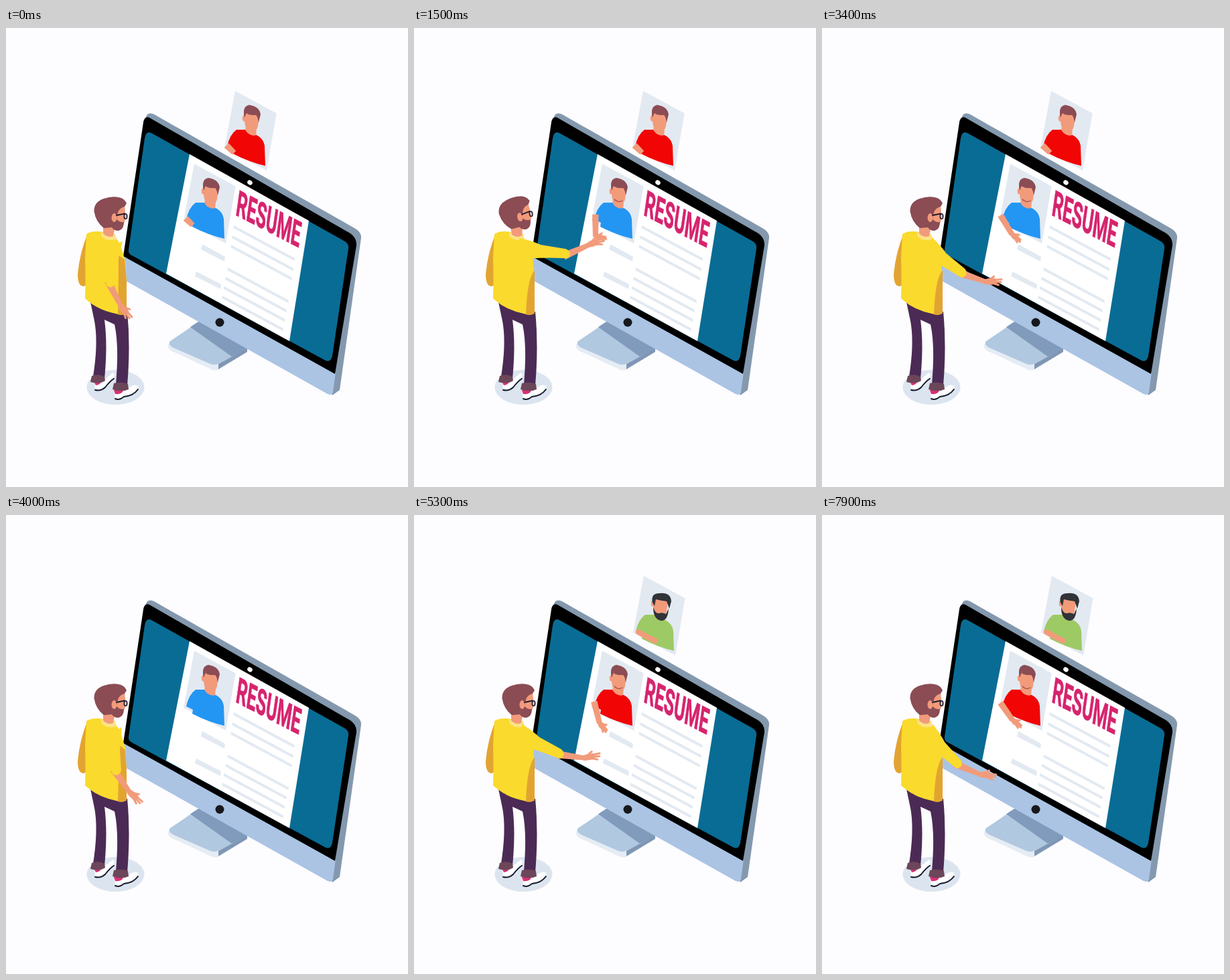
An HTML page that plays this animation: 600 by 686 pixels, repeating every 8 s.

```html
<!DOCTYPE html>
<html lang="en">
<head>
<meta charset="utf-8">
<title>Resume handshake</title>
<style>
  html, body { margin: 0; width: 100%; height: 100%; overflow: hidden; background: #fdfcfe; }
  svg { display: block; width: 100%; height: 100%; }
  .title { font: 700 49px Roboto, "Open Sans", sans-serif; fill: #d6246e; stroke: #d6246e; stroke-width: .7px; vector-effect: non-scaling-stroke; }
</style>
</head>
<body>
<svg id="stage" viewBox="0 0 600 686"></svg>
<script>
const LOOP = 8000, CYCLE = 4400;
const SKIN = '#f29b7b', HAIR = '#8b4c54', PALE = '#e2e9f1', YELLOW = '#fada2c', ORANGE = '#e2a431';
const SHOULDER = [163, 325], PHOTO_SHOULDER = [271, 287];

const shape = (d, fill, extra = '') => `<path d="${d}" fill="${fill}" ${extra}/>`;
const stroke = (d, color, width) =>
  `<path d="${d}" fill="none" stroke="${color}" stroke-width="${width}" stroke-linecap="round" stroke-linejoin="round"/>`;
const textLine = (x, y) => shape(`M${x},${y} l91,49 l-.7,4 l-91,-49 Z`, PALE);

const photoArm = id => `
  <g ${id ? `id="${id}"` : ''} transform="translate(${PHOTO_SHOULDER}) rotate(45)">
    ${shape('M-4,-4.500 L12,-4 V4 L-4,5 Z', SKIN)}
  </g>`;

const shortHair = shape('M295,243 Q291,226 302,224 Q317,226 319,238 L316,250 Q315,242 312,239 Q302,240 298,236 Z', HAIR);
const darkHairAndBeard =
  shape('M294,243 Q291,229 304,229 Q321,227 322,241 L319,252 Q317,246 315,241 Q306,240 299,238 L297,248 Z', '#303338') +
  shape('M295,250 Q299,260 303,259 Q309,257 314,260 L318,252 Q317,270 307,270 Q295,268 295,250 Z', '#303338') +
  stroke('M273,287 L286,294 L298,300', SKIN, 8);

function person(shirt, details) {
  return `
    ${shape('M281,203 L342.500,236.500 L328,322 L265,288 Z', PALE)}
    ${shape('M297,254 L313,258 L312,271 Q305,276 296,264 Z', SKIN)}
    ${shape('M296,261 Q302,272 313,269 Q323,274 325,285 L326,315 Q301,309 278,297 L279,291 L269,286 Q273,268 283,261 Z', shirt)}
    <ellipse cx="294.500" cy="244" rx="2.800" ry="4.500" fill="${SKIN}"/>
    ${shape('M297,233 Q310,231 317,242 L315,256 Q312,266 306,266 Q296,263 295,249 Z', SKIN)}
    ${details}`;
}

const photoHand = `
  <g id="photoHand">
    <ellipse cx="5" cy="0" rx="7" ry="4.500" fill="${SKIN}"/>
    ${stroke('M7,-2 L15,-1 M7,1 L16,2 M6,2 L13,5', SKIN, 3)}
    ${stroke('M3,-2 L9,-6', SKIN, 2.800)}
  </g>`;

const monitor = `
  ${shape('M242,473 V477 Q243,481 250,484 L306,510 Q313,513 318,510 L359,485 V478 L281,442 Z', '#e5ecf4')}
  ${shape('M245,468 L282,443 L360,480 L318,501 Q312,505 305,502 L250,478 Q241,473 245,468 Z', '#b0c8e0')}
  ${shape('M275,447 L290,437 L362,479 L337,491 Z', '#819bbd')}
  ${shape('M317,502 L360,479 V484 L317,510 Z', '#7f97b5')}
  ${shape('M205,140 L211,129 Q215,126 221,129 L520,299 Q531,305 530,314 L498,541 L487,549 L470,500 Z', '#8499ae')}
  ${shape('M175,340 L492,515 L488,544 Q487,550 480,547 L170,373 Z', '#abc4e4')}
  ${shape('M205,141 Q207,131 214,134 L514,307 Q524,314 523,325 L491,517 L175,341 Z', '#000')}
  ${shape('M217,157 L506,319 Q512,323 511,330 L487,490 Q485,500 477,497 L188,340 Q182,337 183,331 L207,165 Q209,153 217,157 Z', '#096c95')}
  <ellipse cx="364" cy="231" rx="4" ry="3.300" transform="rotate(35 364 231)" fill="#fff"/>
  <circle cx="319" cy="440" r="6.500" fill="#16181c"/>
  ${shape('M274,188.500 L452,288 L423,468 L239,367 Z', '#fff')}
  <text class="title" transform="matrix(.497 .257 -.15 1.060 342 279)">RESUME</text>
  ${[[340, 295], [338, 310], [336, 324], [331, 358], [328, 372], [325.500, 386], [323, 400]].map(p => textLine(...p)).join('')}
  ${shape('M293,323 L327,342 L326,349 L291,331 Z', PALE)}
  ${shape('M284,364 L321,383 L320,390 L282,371 Z', PALE)}`;

const legs = `
  <ellipse cx="163.500" cy="537" rx="43" ry="26" fill="#dce5ef"/>
  ${shape('M132,528 L146,526 L160,515 Q164,520 158,527 L144,541 L133,540 Z', '#fff')}
  ${stroke('M133,541 Q142,543 148,537 Q156,527 161,524', '#111a2b', 2)}
  ${shape('M132,530 L142,527 Q142,533 134,534 Z', '#dc2f74')}
  ${shape('M162,543 L177,541 L190,534 Q199,533 198,539 Q192,548 180,548 L170,556 L163,554 Z', '#fff')}
  ${stroke('M163,554 Q169,557 176,551 Q190,550 197,540', '#111a2b', 2)}
  ${shape('M161,541 L175,541 Q174,548 163,547 Z', '#dc2f74')}
  ${shape('M124,400 Q150,425 181,424 Q186,475 181,534 L164,532 Q169,475 162,443 L147,436 Q152,475 147,524 L130,521 Q138,470 132,438 Z', '#4b2b55')}
  ${shape('M128,520 Q138,516 147,521 L148,527 Q140,533 126,529 Z', '#6c4659')}
  ${shape('M161,531 Q172,528 182,532 L183,540 Q172,545 159,540 Z', '#6c4659')}`;

const head = `
  <g id="head">
    ${shape('M145,292 L163,296 L160,311 Q151,314 145,307 Z', SKIN)}
    ${shape('M160,270 L177,265 L179,285 L176,292 L162,292 Z', SKIN)}
    ${shape('M180,262 Q176,254 168,253 Q158,251 146,255 Q131,260 131.500,274 Q134,290 146,299 L158,298 Q161,303 168,303 Q176,301 176,290 Q168,291 165,285 L167,276 Q169,269 177,267 Z', HAIR)}
    <ellipse cx="161.500" cy="283.500" rx="4" ry="6.500" fill="${SKIN}"/>
    ${stroke('M165,280 L177,277.500', '#1c1c30', 1.800)}
    <ellipse cx="178.500" cy="281.500" rx="2.200" ry="3.800" fill="#f5c3b0" stroke="#1c1c30" stroke-width="1.600"/>
  </g>`;

const manArm = `
  <g id="forearm">${shape('M-7,-5.500 L35,-3.200 V3.500 L-7,6 Z', SKIN)}</g>
  <g id="hand">
    ${shape('M-3,-3.500 Q6,-6 14,-4 L15,4 Q6,6 -3,3.500 Z', SKIN)}
    ${stroke('M12,-2 L23,-2 M12,1 L22,2 M10,3 L18,6', SKIN, 3)}
    ${stroke('M5,-3 L12,-7', SKIN, 3)}
  </g>
  <g id="sleeve">
    ${shape('M-8,-10 Q12,-9 24,-6 L60,-7 Q67,-5 67,0 Q67,7 60,7 Q35,11 10,18 Z', YELLOW)}
  </g>`;

document.getElementById('stage').innerHTML = `
  <rect width="600" height="686" fill="#fdfcfe"/>
  <defs><clipPath id="screenClip"><path d="M217,157 L512,322 L485,500 L183,337 Z"/></clipPath></defs>
  <g id="waitingRed">${person('#f20505', shortHair)}${photoArm()}</g>
  <g id="waitingGreen">${person('#9dca64', darkHairAndBeard)}</g>
  ${monitor}
  <g clip-path="url(#screenClip)">
    ${person('#2396f3', shortHair)}
    <g id="shownRed">${person('#f20505', shortHair)}</g>
    <g id="greeter">${photoArm('photoArm')}${photoHand}</g>
    <g id="brows">${stroke('M299,241 Q303,238 306,243 M309,245 Q313,243 315,248', HAIR, 2)}</g>
    <g id="smile">${stroke('M299,256 Q305,262 311,258', '#a9544c', 1.300)}</g>
  </g>
  ${legs}
  ${shape('M122,307 Q110,335 107,368 Q107,386 116,386 L121,384 Z', ORANGE)}
  ${shape('M120,308 Q130,301 150,306 Q165,310 171,325 L178,348 L180,380 V426 Q174,431 164,427 Q135,421 118,404 Q119,380 118,345 Z', YELLOW)}
  <path id="shade" fill="${ORANGE}"/>
  ${shape('M142,306 Q152,302 163,308 L165,316 Q150,320 142,311 Z', '#fbe384')}
  ${head}
  ${manArm}`;

const el = {};
document.querySelectorAll('#stage [id]').forEach(node => el[node.id] = node);

const clamp = x => Math.max(0, Math.min(1, x));
const mix = (a, b, k) => a + (b - a) * k;
const smooth = (t, from, to) => { const x = clamp((t - from) / (to - from)); return x * x * (3 - 2 * x); };
const overshoot = x => { const s = 3, y = x - 1; return 1 + (s + 1) * y ** 3 + s * y * y; };
const polar = ([x, y], angle, r) =>
  [x + r * Math.cos(angle * Math.PI / 180), y + r * Math.sin(angle * Math.PI / 180)];

// Piecewise-linear curve through [x, y] stops.
function curve(stops, x) {
  const i = Math.max(1, stops.findIndex(s => s[0] >= x));
  const [a, b] = [stops[i - 1], stops[i]];
  return mix(a[1], b[1], clamp((x - a[0]) / (b[0] - a[0])));
}

// Joint angles by how far the arm reaches out.
const FOREARM = [[0, 63], [.55, 23], [.66, 18], [.78, 7], [1, -24]];
const HAND = [[0, 50], [.55, 5], [.66, -5], [.78, -12], [1, -20]];
const PHOTO_ARM = [[0, 45], [.66, 60], [.78, 77], [1, 90]];
const PHOTO_HAND = [[0, 30], [.66, 36], [.78, 47], [1, 5]];

const place = (node, [x, y], angle = 0, scale = '1') =>
  node.setAttribute('transform', `translate(${x},${y}) rotate(${angle}) scale(${scale})`);
const show = (node, visible) => node.setAttribute('opacity', +visible);

function poseMan(reach, nod) {
  const upper = mix(97, 11, reach), length = mix(60, 68, reach);
  const lower = curve(FOREARM, reach);
  const elbow = polar(SHOULDER, upper, length);
  place(el.sleeve, SHOULDER, upper, `${length / 64},1`);
  place(el.forearm, elbow, lower);
  place(el.hand, polar(elbow, lower, 35), curve(HAND, reach));
  const k = clamp(reach * 2);
  el.shade.setAttribute('d',
    `M${mix(168, 180, k)},${mix(340, 362, k)} Q${mix(168, 169, k)},${mix(380, 374, k)} 167,428
     Q176,430 180,426 V380 L${mix(177, 180, k)},${mix(346, 370, k)} Z`);
  el.head.setAttribute('transform', `rotate(${nod} 155 302)`);
}

function posePhotoArm(reach) {
  const angle = curve(PHOTO_ARM, reach), length = mix(11, 25, clamp(reach * 2));
  place(el.photoArm, PHOTO_SHOULDER, angle, `${length / 12},1`);
  place(el.photoHand, polar(PHOTO_SHOULDER, angle, length), curve(PHOTO_HAND, reach), clamp(reach * 3));
}

function render(t) {
  const c = t % CYCLE;
  const reach = smooth(c, 0, 1300) * (1 - smooth(c, 2800, 4300));
  const nod = curve([[0, 0], [900, -10], [1700, -10], [2300, -7], [3000, 0], [LOOP, 0]], t);
  poseMan(reach, nod);
  posePhotoArm(reach * (1 - smooth(c, 3400, 3800)));

  const drop = smooth(t, 3700, 4000), rise = clamp((t - 4000) / 350);
  place(el.waitingRed, [61 - 20 * drop, -109 + 130 * drop]);
  place(el.waitingGreen, [62, -112 + 130 * (1 - overshoot(rise))]);
  show(el.waitingRed, drop < 1);
  show(el.waitingGreen, rise > 0);

  const enter = smooth(t, 3850, 4250), settled = enter === 0 || enter === 1;
  place(el.shownRed, [25 * (1 - enter), -150 * (1 - enter)]);
  show(el.shownRed, enter > 0);
  show(el.greeter, settled);
  show(el.brows, t > 600 && t < 1300);
  show(el.smile, t >= 1300 && settled);
}

const start = performance.now();
function tick() {
  render((performance.now() - start) % LOOP);
  requestAnimationFrame(tick);
}
tick();
</script>
</body>
</html>
```
